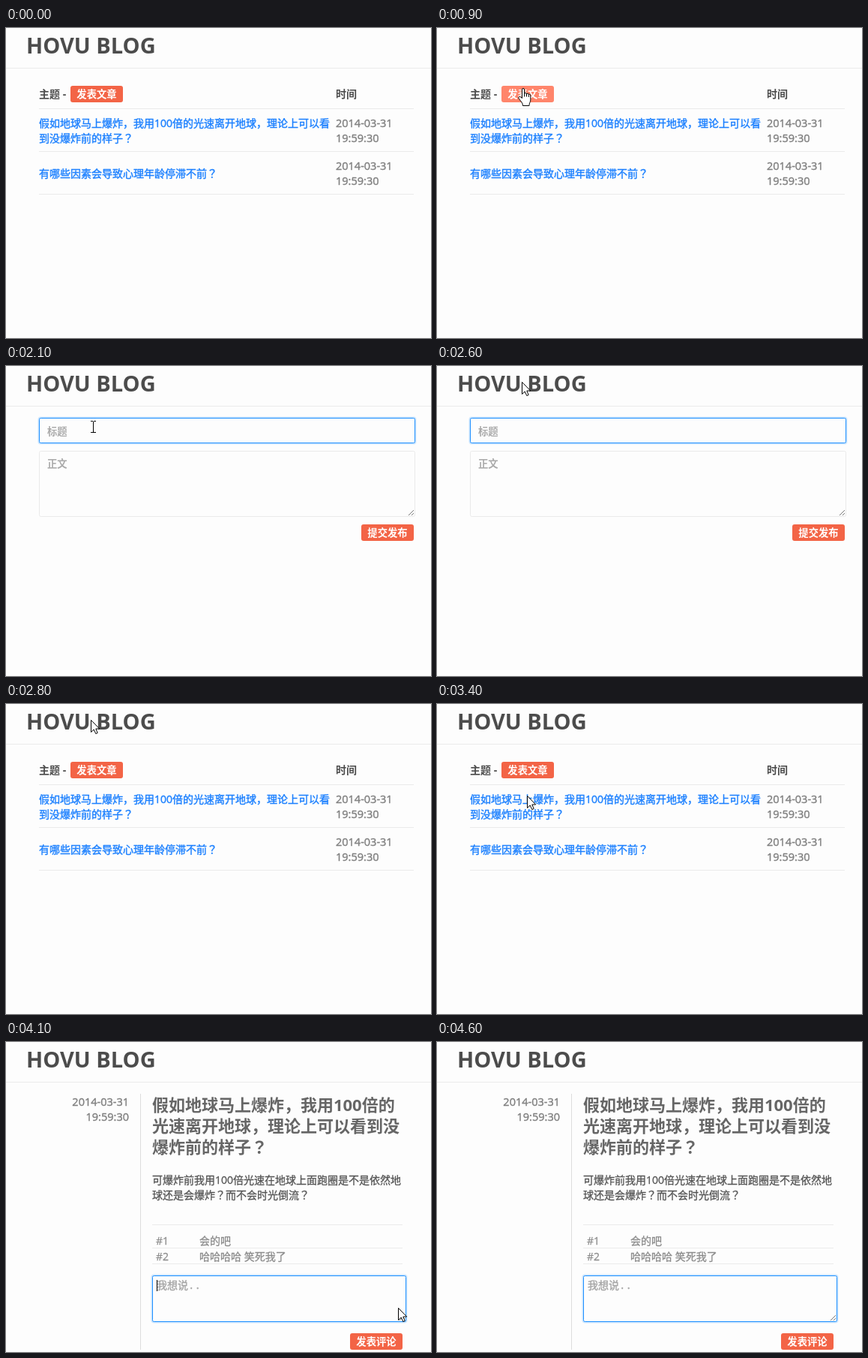
Write an HTML page with a canvas that moves like this. It is 567 px wide and 413 px high and loops after 4.7 s.

```html
<!DOCTYPE html>
<html>
<head>
<meta charset="utf-8">
<title>Blog demo</title>
<style>
html, body { margin: 0; width: 100%; height: 100%; overflow: hidden; background: #fdfdfd; }
canvas { display: block; }
</style>
</head>
<body>
<canvas id="stage" width="567" height="413"></canvas>
<script>
const ctx = document.getElementById('stage').getContext('2d');
const LOOP = 4700, STEP = 100;
const SANS = '"Open Sans", "Noto Sans CJK SC", "Noto Sans CJK", sans-serif';
const MONO = '"Noto Sans Mono", "Noto Sans CJK SC", "Noto Sans CJK", monospace';
const CENTERED = '"Noto Sans CJK JP", "Noto Sans CJK", sans-serif';
const BG = '#fdfdfd', LINK = '#1c80ff', RULE = '#ebebeb';

// Each entry holds until the next one: [time, shape, hotspot x, hotspot y]
const pointer = [
  [0, ''],
  [400, 'arrow', 404, 34], [500, 'arrow', 286, 65], [600, 'arrow', 210, 80],
  [700, 'hand', 143, 83], [800, 'hand', 118, 82], [900, 'hand', 115, 80],
  [1500, 'arrow', 115, 80], [1600, 'beam', 116, 81],
  [2300, 'beam', 117, 74], [2400, 'arrow', 112, 47], [2500, 'hand', 113, 35],
  [2600, 'arrow', 113, 21],
  [2900, 'arrow', 101, 55], [3000, 'arrow', 130, 102], [3100, 'hand', 120, 122],
  [3400, 'arrow', 120, 122],
  [4000, 'arrow', 290, 215], [4100, 'arrow', 523, 354], [4200, '']
];
const pages = [[0, list], [1500, form], [2800, list], [3600, article]];
const hover = [[0, 0], [700, 0.4], [800, 0.8], [900, 1], [1500, 0]];
const focus = [
  [0, 0], [1600, 0.1], [1700, 0.6], [1800, 1], [2700, 0.5], [2800, 0],
  [3600, 0.6], [3700, 1], [4500, 0.75], [4600, 1]
];
const caret = [[0, false], [1500, true], [2100, false], [3600, true], [4200, false]];

const at = (track, t) => track.findLast(key => key[0] <= t);
const valueAt = (track, t) => at(track, t)[1];

function mix(a, b, k) {
  return `rgb(${a.map((v, i) => Math.round(v + (b[i] - v) * k)).join(',')})`;
}

// y is the middle of the line; heft thickens the strokes.
// Question marks come from a face that centres them in their cell.
function text(str, x, y, color, { size = 14, weight = 400, family = SANS, align = 'left', heft = 0 } = {}) {
  const base = y + Math.round(size * 0.37);
  ctx.textAlign = align;
  ctx.fillStyle = ctx.strokeStyle = color;
  ctx.lineWidth = heft;
  ctx.lineJoin = 'round';
  for (const part of str.split(/(？)/)) {
    ctx.font = `${weight} ${size}px ${part === '？' ? CENTERED : family}`;
    ctx.fillText(part, x, base);
    if (heft) ctx.strokeText(part, x, base);
    x += ctx.measureText(part).width;
  }
}

function rect(x, y, w, h, color) {
  ctx.fillStyle = color;
  ctx.fillRect(x, y, w, h);
}

function button(label, x, y, lit = 0) {
  ctx.fillStyle = mix([243, 100, 70], [255, 133, 107], lit);
  ctx.beginPath();
  ctx.roundRect(x, y, 70, 22, 3);
  ctx.fill();
  text(label, x + 35, y + 11, '#fff', { size: 13.33, weight: 700, align: 'center' });
}

function field(x, y, w, h, lit) {
  ctx.beginPath();
  ctx.roundRect(x + 0.5, y + 0.5, w - 1, h - 1, 2);
  if (lit) {
    ctx.strokeStyle = `rgba(30,144,255,${0.22 * lit * lit})`;
    ctx.lineWidth = 4;
    ctx.stroke();
  }
  ctx.fillStyle = BG;
  ctx.fill();
  ctx.strokeStyle = mix([234, 234, 234], [30, 144, 255], lit);
  ctx.lineWidth = 1;
  ctx.stroke();
}

function grip(x, y) {
  ctx.strokeStyle = '#777';
  ctx.lineWidth = 1;
  ctx.beginPath();
  for (const d of [7, 3]) {
    ctx.moveTo(x - d, y);
    ctx.lineTo(x, y - d);
  }
  ctx.stroke();
}

function stamp(x, y, align) {
  const style = { size: 14.5, heft: 0.4, align };
  text('2014-03-31', x, y, '#808080', style);
  text('19:59:30', x, y + 20, '#808080', style);
}

function list(t) {
  const bold = { weight: 700 }, link = { heft: 0.4 };
  text('主题 -', 44, 88, '#4c4c4c', bold);
  text('时间', 440, 88, '#4c4c4c', bold);
  button('发表文章', 86, 77, valueAt(hover, t));
  for (const y of [107, 164, 221]) rect(44, y, 500, 1, RULE);
  text('假如地球马上爆炸，我用100倍的光速离开地球，理论上可以看', 44, 127, LINK, link);
  text('到没爆炸前的样子？', 44, 147, LINK, link);
  text('有哪些因素会导致心理年龄停滞不前？', 44, 194, LINK, link);
  stamp(440, 127);
  stamp(440, 184);
}

function form(t) {
  const hint = { size: 13.33, weight: 700 };
  field(44, 69, 502, 34, valueAt(focus, t));
  field(44, 113, 502, 88, 0);
  text('标题', 55, 87, '#aaa', hint);
  text('正文', 55, 130, '#aaa', hint);
  grip(544, 199);
  button('提交发布', 474, 211);
  if (valueAt(caret, t)) rect(55, 78, 1, 16, '#000');
}

function article(t) {
  const body = { heft: 0.3 };
  stamp(164, 80, 'right');
  rect(179, 69, 1, 341, '#ddd');
  ['假如地球马上爆炸，我用100倍的', '光速离开地球，理论上可以看到没', '爆炸前的样子？'].forEach((line, i) =>
    text(line, 195, 84 + i * 28, '#666', { size: 22, weight: 700 }));
  text('可爆炸前我用100倍光速在地球上面跑圈是不是依然地', 195, 184, '#555', body);
  text('球还是会爆炸？而不会时光倒流？', 195, 204, '#555', body);
  for (const y of [243, 274, 295]) rect(195, y, 334, 1, RULE);
  ['会的吧', '哈哈哈哈 笑死我了'].forEach((reply, i) => {
    text('#' + (i + 1), 200, 265 + i * 21, '#8c8c8c', body);
    text(reply, 258, 265 + i * 21, '#8c8c8c', body);
  });
  field(195, 311, 339, 62, valueAt(focus, t));
  text('我想说..', 201, 324, '#a5a5a5', { family: MONO, heft: 0.4 });
  grip(532, 371);
  if (valueAt(caret, t)) rect(201, 317, 1, 15, '#000');
  button('发表评论', 459, 388);
}

const arrowPath = new Path2D('M.5 .5V16.5L4.2 13L6.8 18.6L9.2 17.5L6.8 12H11.7Z');
const handPath = new Path2D('M5.5 13.5V2Q5.5 .5 7 .5Q8.5 .5 8.5 2V7.5Q8.5 6.5 10 6.5Q11.5 6.5 11.5 8' +
  'Q11.5 7.2 12.8 7.2Q14.3 7.2 14.3 8.8Q14.3 8.2 15.3 8.2Q16.8 8.2 16.8 10V15.5Q16.8 17.5 15.8 19.5' +
  'Q15 21 15 23.5H6.5Q6.5 21 5 19L1.5 14.5Q0 12.3 1.5 11.6Q2.8 11 4 12.2Z');
const knucklePath = new Path2D('M8.5 7V11.5M11.5 8V11.5M14.3 9V12');

function drawPointer([, shape, x, y]) {
  if (!shape) return;
  if (shape === 'beam') {
    rect(x, y - 7, 1, 15, '#000');
    for (const dy of [-8, 7]) {
      rect(x - 3, y + dy, 3, 1, '#000');
      rect(x + 1, y + dy, 3, 1, '#000');
    }
    return;
  }
  const isHand = shape === 'hand';
  const path = isHand ? handPath : arrowPath;
  ctx.save();
  ctx.translate(isHand ? x - 7 : x, y);
  ctx.lineWidth = 1;
  ctx.lineJoin = 'round';
  ctx.fillStyle = '#fff';
  ctx.strokeStyle = '#000';
  ctx.fill(path);
  ctx.stroke(path);
  if (isHand) ctx.stroke(knucklePath);
  ctx.restore();
}

function draw(now) {
  const t = Math.floor((now % LOOP) / STEP) * STEP;
  rect(0, 0, 567, 413, BG);
  text('HOVU BLOG', 27, 23, '#4c4c4c', { size: 29, weight: 700 });
  rect(0, 53, 567, 1, RULE);
  valueAt(pages, t)(t);
  drawPointer(at(pointer, t));
}

const start = performance.now();
function tick() {
  draw(performance.now() - start);
  requestAnimationFrame(tick);
}
tick();
</script>
</body>
</html>
```
